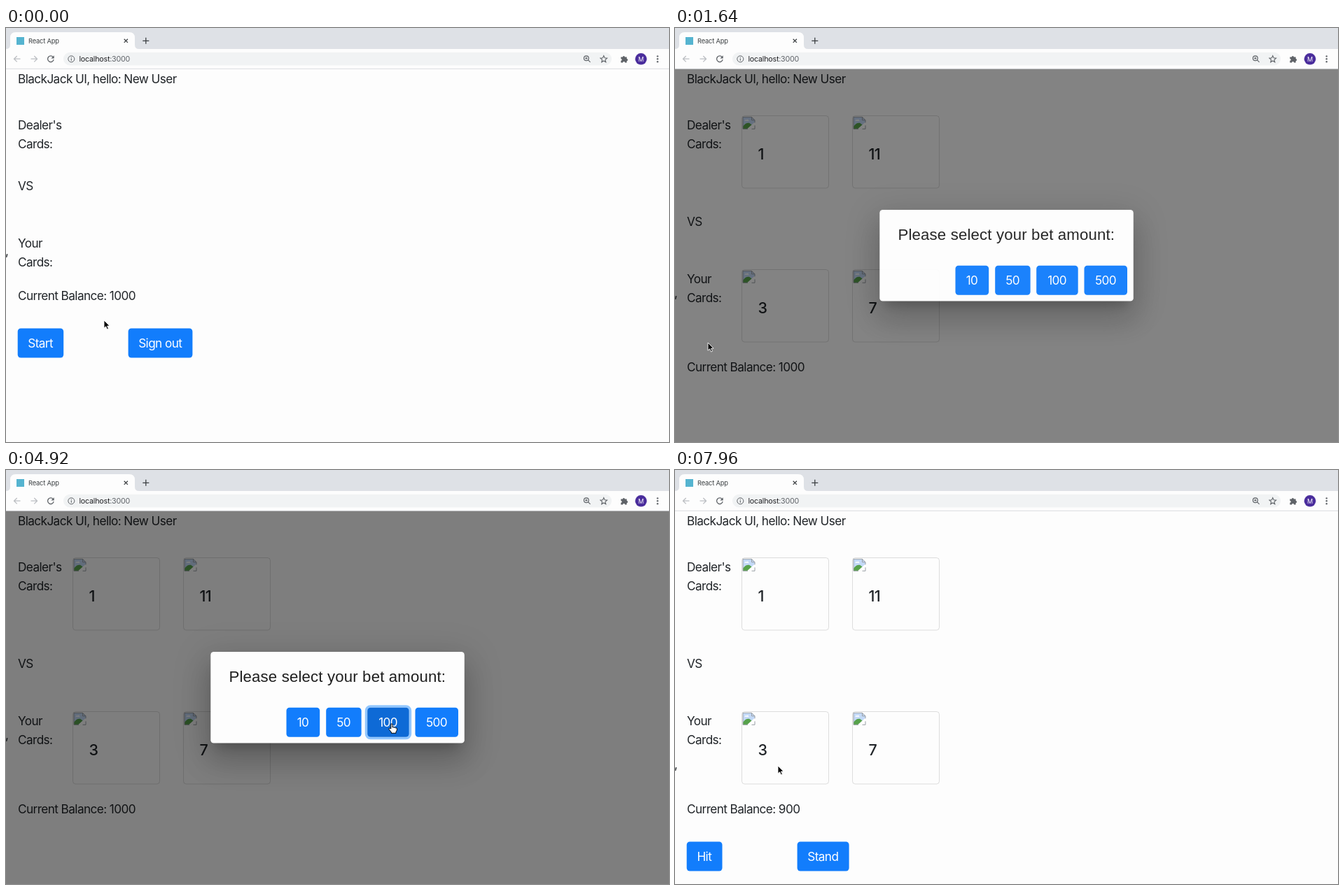
Animation of 947 by 592 pixels, one loop 8 s. Source, as an HTML page:

```html
<!DOCTYPE html>
<html lang="en">
<head>
<meta charset="utf-8">
<title>React App</title>
<style>
  html, body { margin: 0; width: 100%; height: 100%; overflow: hidden; background: #fdfdfd; }
  svg { display: block; width: 947px; height: 592px; font-family: Inter, sans-serif; font-optical-sizing: none; }
  .body { font-size: 17.2px; letter-spacing: -.034em; fill: #212529; }
  .label { fill: #fff; }
  .num { font-size: 21.5px; font-weight: 500; letter-spacing: -.03em; fill: #212529; }
  .title { font: 22.2px "Liberation Sans", Arial, sans-serif; letter-spacing: .0075em; fill: #1f1f1f; }
  .small { font-size: 9.3px; letter-spacing: -.02em; fill: #3c4043; }
  .url { font-size: 10.7px; letter-spacing: -.02em; fill: #202124; }
  .icon { fill: none; stroke: #5f6368; stroke-width: 1.3; }
  .card { fill: none; stroke: #000; stroke-opacity: .125; }
</style>
</head>
<body>
<svg id="stage" viewBox="0 0 947 592">
  <defs>
    <symbol id="broken" width="19" height="19" viewBox="0 0 19 19">
      <path d="M1 1H13.5L18 5.5V9.5L9.5 18H1Z" fill="#c3d9f7"/>
      <path d="M1 18V14.5Q5 8.5 10 9.5L14 12.5L9.5 18Z" fill="#57a24b"/>
      <path d="M3.5 6.5a1.6 1.6 0 0 1 2.6-1.4a2 2 0 0 1 3.4 1.4Z" fill="#fff"/>
      <path d="M18 9.5L8 18.5" stroke="#fff" stroke-width="2"/>
      <path d="M8 18H1V1H13.5L18 5.5V9M13.5 1V5.5H18M18 13V18H13.5" fill="none" stroke="#9aa0a6"/>
    </symbol>
  </defs>

  <rect width="947" height="592" fill="#fdfdfd"/>
  <g id="page">
    <text class="body" x="17" y="78.5">BlackJack UI, hello: New User</text>
    <text class="body" x="17" y="145">Dealer's</text>
    <text class="body" x="17" y="172">Cards:</text>
    <text class="body" id="vs" x="17">VS</text>
    <text class="body" id="your" x="17">Your</text>
    <text class="body" id="yourCards" x="17">Cards:</text>
    <text class="body" id="comma" x="-1">,</text>
    <text class="body" id="balance" x="17"></text>
    <g id="cards"></g>
    <g id="lobby"></g>
    <g id="play"></g>
  </g>

  <g id="dialog">
    <rect y="58" width="947" height="534" opacity=".5"/>
    <rect x="300" y="280" width="347" height="115" opacity=".2" style="filter:blur(8px)"/>
    <rect x="289" y="284" width="369" height="137" opacity=".14" style="filter:blur(21px)"/>
    <rect x="283" y="261" width="381" height="149" opacity=".12" style="filter:blur(25px)"/>
    <rect x="292.3" y="260" width="362.5" height="130.6" rx="4.4" fill="#fdfdfd"/>
    <text class="title" x="318.5" y="302.5">Please select your bet amount:</text>
    <g id="bets"></g>
  </g>

  <g id="browser">
    <rect width="947" height="30" fill="#dee1e6"/>
    <path d="M0 30Q6 30 6 24V14Q6 6 14 6H176Q184 6 184 14V24Q184 30 190 30V31H0Z" fill="#fdfdfd"/>
    <rect y="30" width="947" height="28" fill="#fdfdfd"/>
    <path d="M0 58.3H947" stroke="#dadce0"/>
    <rect x="15" y="13" width="11" height="11" fill="#55b4d0"/>
    <text class="small" x="32" y="21.7">React App</text>
    <path class="icon" d="M168.7 15.7l5.2 5.2m0-5.2l-5.2 5.2M195.3 18.3h9M199.8 13.8v9" style="stroke:#3c4043"/>
    <path class="icon" d="M20.5 44.2h-9m4.2-4.2l-4.2 4.2l4.2 4.2M35.5 44.2h9m-4.2-4.2l4.2 4.2l-4.2 4.2" style="stroke:#bcbfc3"/>
    <path class="icon" d="M67.3 41.6a4.3 4.3 0 1 0 .8 3.5"/>
    <path d="M68.7 39.2v4.3h-4.3z" fill="#5f6368"/>
    <rect x="82" y="34.8" width="783" height="18.8" rx="9.4" fill="#f1f3f4"/>
    <circle class="icon" cx="93.3" cy="44.3" r="4.5" style="stroke-width:1"/>
    <path class="icon" d="M93.3 43.6v3.2M93.3 41.4v1.2" style="stroke-width:1.1"/>
    <text class="url" x="104.5" y="48.2">localhost<tspan fill="#5f6368">:3000</tspan></text>
    <circle class="icon" cx="828.9" cy="43.2" r="3.4" style="stroke-width:1.2"/>
    <path class="icon" d="M831.4 45.7l3.2 3.2M827.2 43.2h3.4M828.9 41.5v3.4" style="stroke-width:1.1"/>
    <path class="icon" d="M853.8 39.6l1.4 3.2l3.4.3l-2.6 2.3l.8 3.4l-3-1.8l-3 1.8l.8-3.4l-2.6-2.3l3.4-.3z" style="stroke-width:1.1"/>
    <path d="M878.3 41.4h2.6a1.5 1.5 0 1 1 3 0h2.8v2.7a1.5 1.5 0 1 1 0 3v2.4h-2.7a1.4 1.4 0 1 0-2.8 0h-2.9v-2.7a1.4 1.4 0 1 0 0-2.8z" fill="#5f6368"/>
    <circle cx="907" cy="44.3" r="8.3" fill="#4a2d9c"/>
    <text x="907" y="47.6" text-anchor="middle" font-size="9" fill="#fff">M</text>
    <g fill="#5f6368">
      <circle cx="930.7" cy="40.4" r="1.2"/><circle cx="930.7" cy="44.3" r="1.2"/><circle cx="930.7" cy="48.2" r="1.2"/>
    </g>
  </g>

  <path id="arrow" d="M0 0V11.2L2.6 8.8L4.5 13L6.4 12.2L4.6 8.1H8.1Z" fill="#000" stroke="#fff" stroke-width=".9"/>
  <path id="hand" d="M-1.2 7V1A1.1 1.1 0 0 1 1.1 1V5Q2.2 4 3.3 5.3Q4.5 4.4 5.4 5.8Q7.5 5.2 7.5 7.3Q7.5 10 6 11.5V13.3H-.6V12Q-2.5 9.8-4 7.6Q-4.2 6-2.7 6.2Z" fill="#fff" stroke="#000" stroke-width="1"/>
</svg>
<script>
const LOOP = 8000, TICK = 40, DEAL = 1480, BET = 5120;
const $ = id => document.getElementById(id);
const clamp = v => Math.max(0, Math.min(1, v));
const ramp = (t, from, to) => clamp((t - from) / (to - from));

function add(parent, tag, attrs, text) {
  const el = document.createElementNS('http://www.w3.org/2000/svg', tag);
  for (const k in attrs) el.setAttribute(k, attrs[k]);
  if (text) el.textContent = text;
  parent.appendChild(el);
  return el;
}

function button(parent, label, x, y, w) {
  const ring = add(parent, 'rect', { x: x - 1.7, y: y - 1.7, width: w + 3.4, height: 45.4, rx: 6,
    fill: 'none', stroke: '#268fff', 'stroke-width': 3.5, 'stroke-opacity': .5, opacity: 0 });
  const box = add(parent, 'rect', { x, y, width: w, height: 42, rx: 4.4 });
  add(parent, 'text', { class: 'body label', x: x + w / 2 - .3, y: y + 27.4, 'text-anchor': 'middle' }, label);
  const press = p => {
    const mix = (a, b) => Math.round(a + (b - a) * p);
    box.setAttribute('fill', `rgb(${mix(18, 14)},${mix(125, 106)},${mix(252, 214)})`);
    ring.setAttribute('opacity', p);
  };
  press(0);
  return press;
}

function card(x, y, value) {
  add($('cards'), 'rect', { class: 'card', x, y, width: 124, height: 103.5, rx: 4 });
  add($('cards'), 'use', { href: '#broken', x: x + .5, y: y + .8 });
  add($('cards'), 'text', { class: 'num', x: x + 23, y: y + 62.5 }, value);
}

card(95.5, 125.5, '1');
card(253.5, 125.5, '11');
card(95.5, 345.5, '3');
card(253.5, 345.5, '7');
const pressStart = button($('lobby'), 'Start', 16.7, 429.5, 65.5);
button($('lobby'), 'Sign out', 174.6, 429.5, 91.8);
button($('play'), 'Hit', 16.7, 531.5, 50.8);
button($('play'), 'Stand', 174.6, 531.5, 74);
button($('bets'), '10', 400.5, 339.7, 47.7);
button($('bets'), '50', 457.2, 339.7, 50.4);
const press100 = button($('bets'), '100', 516.2, 339.7, 59.5);
button($('bets'), '500', 584.5, 339.7, 61.5);

// pointer tip: time, x, y
const path = [
  [0, 140, 418], [120, 65, 449], [400, 65, 449], [440, 73, 440], [540, 56, 458], [640, 47, 450],
  [2520, 47, 450], [2900, 170, 442], [3360, 405, 382], [3600, 432, 362], [3960, 478, 355],
  [4240, 458, 364], [4440, 496, 382], [4680, 551, 363], [5160, 551, 363], [5200, 550, 363],
  [5360, 550, 363], [5760, 310, 455], [6200, 76, 518], [6880, 112, 500], [7320, 112, 500], [7960, 147, 423], [8000, 147, 423]
];

function pointer(t) {
  const i = Math.max(1, path.findIndex(p => p[0] >= t));
  const a = path[i - 1], b = path[i];
  const u = ramp(t, a[0], b[0]), s = u + (u * u * (3 - 2 * u) - u) * .5;
  return [a[1] + (b[1] - a[1]) * s, a[2] + (b[2] - a[2]) * s];
}

const show = (id, on) => $(id).style.display = on ? '' : 'none';
const setY = (id, y) => $(id).setAttribute('y', y);

function fade(t) {
  if (t < DEAL || t >= 5200) return 0;
  if (t < 1640) return .2;
  if (t < 1760) return .96;
  return t < BET ? 1 : .5;
}

function draw(t) {
  const dealt = t >= DEAL, playing = t >= BET;
  setY('vs', dealt ? 282.7 : 231.7);
  setY('your', dealt ? 364.7 : 313.7);
  setY('yourCards', dealt ? 391.5 : 340.5);
  setY('balance', dealt ? 491.3 : 389.3);
  setY('comma', playing ? 427 : dealt ? 385 : 325);
  $('balance').textContent = 'Current Balance: ' + (playing ? 900 : 1000);
  show('cards', dealt);
  show('lobby', !dealt);
  show('play', playing);

  pressStart(ramp(t, 880, 1040));
  press100(ramp(t, 4800, 4920));
  const f = fade(t);
  show('dialog', f > 0);
  $('dialog').setAttribute('opacity', f);

  const [x, y] = pointer(t);
  const overBet = dealt && !playing && x > 400 && x < 646 && y > 339 && y < 382;
  show('arrow', !overBet);
  show('hand', overBet);
  $(overBet ? 'hand' : 'arrow').setAttribute('transform', `translate(${x} ${y})`);
}

function loop() {
  const t = performance.now() % LOOP;
  draw(Math.floor(t / TICK) * TICK);
  requestAnimationFrame(loop);
}
loop();
</script>
</body>
</html>
```
